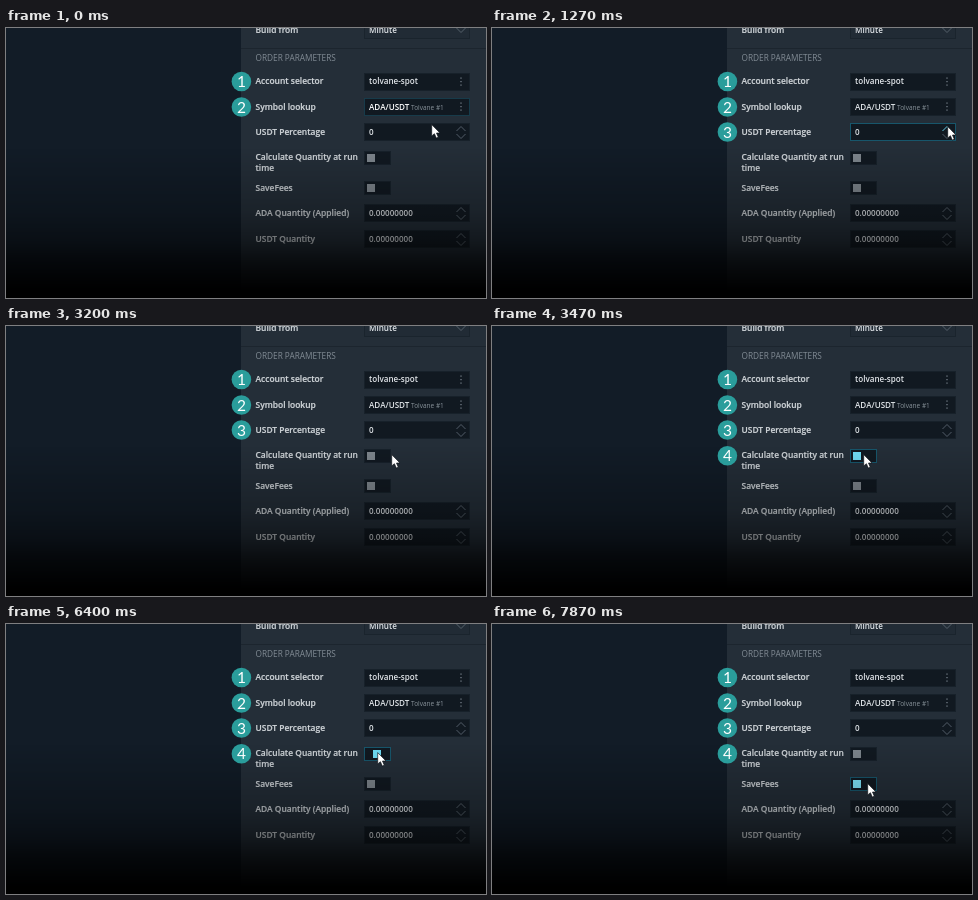
These frames come from a looping animation (480 px wide and 270 px high, 8 s). An HTML page:

```html
<!DOCTYPE html>
<html lang="en">
<head>
<meta charset="utf-8">
<title>Order parameters</title>
<style>
  html, body { margin: 0; width: 100%; height: 100%; overflow: hidden; background: #000; }
  svg { display: block; width: 100vw; height: 100vh; }
  text { font-family: "Open Sans", "Noto Sans", sans-serif; white-space: pre; }

  .label { font-size: 8.45px; font-weight: 600; fill: #cfd4d8; stroke: #cfd4d8; stroke-width: .2; }
  .head { font-size: 8.25px; fill: #828c95; }
  .value { font-size: 8.1px; font-weight: 600; fill: #e2e6ea; }
  .note { font-size: 6.5px; font-weight: 400; fill: #8a949c; }
  .field { fill: #111921; stroke: #17212a; }
  .select { fill: #212b35; stroke: #1a242d; }
  .icon { fill: none; stroke: #5b6670; stroke-width: .9; }
  .dots { fill: #7d8790; }
  .knob { fill: #7c848b; }
  .badge circle { fill: #2a9d9b; }
  .badge text { font: 15.5px Lato, sans-serif; fill: #fff; text-anchor: middle; }
  .focus { fill: none; stroke: #17566b; opacity: 0; }

  .anim { animation: 8s linear infinite; }
  .cursor { animation-name: move; }
  .three { animation-name: three; }
  .four { animation-name: four; }
  .symbol { animation-name: symbol; }
  .symbol-focus { animation-name: symbol-focus; }
  .percent { animation-name: percent; }
  .up { animation-name: up; }
  .quantity { animation-name: quantity; }
  .calc-knob { animation-name: slide, calc-tint; }
  .calc-focus { animation-name: calc-focus; }
  .fees-knob { animation-name: fees-tint; }
  .fees-focus { animation-name: fees-focus; }

  @keyframes move {
    0% { transform: translate(426px, 97px); animation-timing-function: steps(8); }
    6.6%, 10% { transform: translate(450.5px, 106px); animation-timing-function: steps(7); }
    15.8%, 32.5% { transform: translate(456px, 99px); animation-timing-function: step-end; }
    33.3% { transform: translate(454.5px, 99px); animation-timing-function: steps(2); }
    35% { transform: translate(445px, 103px); animation-timing-function: steps(2); }
    36.65% { transform: translate(427px, 111px); animation-timing-function: steps(4); }
    39.95% { transform: translate(386px, 129px); animation-timing-function: steps(4); }
    43.3%, 93.3% { transform: translate(372px, 129px); animation-timing-function: steps(3); }
    95.8% { transform: translate(374px, 145px); animation-timing-function: steps(3); }
    98.3%, 100% { transform: translate(376px, 160px); }
  }
  @keyframes three {
    0%, 3.3% { opacity: 0; animation-timing-function: steps(4); }
    6.6%, 100% { opacity: 1; }
  }
  @keyframes four {
    0%, 40% { opacity: 0; animation-timing-function: steps(4); }
    43.3%, 100% { opacity: 1; }
  }
  @keyframes symbol {
    0%, .8% { fill: #fff; animation-timing-function: steps(3); }
    3.3%, 100% { fill: #e2e6ea; }
  }
  @keyframes symbol-focus {
    0%, .8% { opacity: .5; animation-timing-function: steps(3); }
    3.3%, 100% { opacity: 0; }
  }
  @keyframes percent {
    0%, .8% { opacity: 0; animation-timing-function: steps(3); }
    3.3%, 36% { opacity: 1; animation-timing-function: steps(3); }
    38.5%, 100% { opacity: 0; }
  }
  @keyframes up {
    0%, 13% { stroke: #5b6670; animation-timing-function: steps(2); }
    15%, 34% { stroke: #6fdcf5; animation-timing-function: steps(2); }
    36%, 100% { stroke: #5b6670; }
  }
  @keyframes quantity {
    0%, 80% { visibility: visible; animation-timing-function: step-end; }
    50.875% { visibility: hidden; animation-timing-function: step-end; }
    100% { visibility: visible; }
  }
  @keyframes slide {
    0% { transform: none; animation-timing-function: step-end; }
    50.875% { transform: translateX(7px); animation-timing-function: step-end; }
    51.625% { transform: translateX(11px); animation-timing-function: step-end; }
    52.5% { transform: translateX(13px); animation-timing-function: step-end; }
    80% { transform: translateX(6px); animation-timing-function: step-end; }
    80.875% { transform: translateX(2px); animation-timing-function: step-end; }
    81.625%, 100% { transform: none; }
  }
  @keyframes calc-tint {
    0%, 40.8% { fill: #7c848b; animation-timing-function: steps(3); }
    43.3%, 95% { fill: #6fdcf5; animation-timing-function: steps(3); }
    97.5%, 100% { fill: #7c848b; }
  }
  @keyframes calc-focus {
    0%, 40.8% { opacity: 0; animation-timing-function: steps(3); }
    43.3%, 95% { opacity: 1; animation-timing-function: steps(3); }
    97.5%, 100% { opacity: 0; }
  }
  @keyframes fees-tint {
    0%, 96.6% { fill: #7c848b; animation-timing-function: steps(2); }
    98.3%, 100% { fill: #7fe6fb; }
  }
  @keyframes fees-focus {
    0%, 96.6% { opacity: 0; animation-timing-function: steps(2); }
    98.3%, 100% { opacity: 1; }
  }
</style>
</head>
<body>
<svg viewBox="0 0 480 270" preserveAspectRatio="none">
  <defs>
    <linearGradient id="shade" gradientUnits="userSpaceOnUse" x1="0" y1="120" x2="0" y2="264">
      <stop offset="0" stop-opacity="0"/>
      <stop offset=".45" stop-opacity=".25"/>
      <stop offset=".63" stop-opacity=".44"/>
      <stop offset=".8" stop-opacity=".74"/>
      <stop offset="1"/>
    </linearGradient>
    <rect id="box" x="358.5" y=".5" width="105" height="17"/>
    <rect id="switch" x="358.5" y=".5" width="26" height="13"/>
    <path id="chevron-up" d="M450.5 8 l4.5 -4.5 l4.5 4.5"/>
    <path id="chevron-down" d="M450.5 11 l4.5 4.5 l4.5 -4.5"/>
    <g id="more">
      <rect x="454.4" y="4.5" width="1.2" height="1.2"/>
      <rect x="454.4" y="8" width="1.2" height="1.2"/>
      <rect x="454.4" y="11.5" width="1.2" height="1.2"/>
    </g>
  </defs>

  <rect width="480" height="270" fill="#121c27"/>
  <rect x="235" width="245" height="270" fill="#242e38"/>
  <path d="M235 20.5 H480" stroke="#1c252e"/>

  <use href="#box" class="select" y="-7"/>
  <g class="field">
    <use href="#box" y="45"/>
    <use href="#box" y="70"/>
    <use href="#box" y="95"/>
    <use href="#switch" y="123"/>
    <use href="#switch" y="153"/>
  </g>

  <g class="label">
    <text x="249.5" y="5">Build from</text>
    <text x="249.5" y="56">Account selector</text>
    <text x="249.5" y="81.5">Symbol lookup</text>
    <text x="249.5" y="107">USDT Percentage</text>
    <text x="249.5" y="132.3">Calculate Quantity at run</text>
    <text x="249.5" y="143">time</text>
    <text x="249.5" y="162.5">SaveFees</text>
    <text x="249.5" y="188">ADA Quantity (Applied)</text>
    <text x="249.5" y="213.5">USDT Quantity</text>
  </g>
  <text class="head" x="249.5" y="32.7">ORDER PARAMETERS</text>

  <g class="value">
    <text x="363" y="5">Minute</text>
    <text x="363" y="56.3">tolvane-spot</text>
    <text class="anim symbol" x="363" y="81.8">ADA/USDT</text>
    <text class="note" x="405" y="81.8">Tolvane #1</text>
    <text x="363" y="107.2">0</text>
  </g>

  <path class="icon" d="M450.5 0 l4.5 4.5 l4.5 -4.5"/>
  <g class="dots">
    <use href="#more" y="45"/>
    <use href="#more" y="70"/>
  </g>
  <use href="#box" class="focus anim symbol-focus" y="70"/>
  <use href="#box" class="focus anim percent" y="95"/>
  <g class="icon">
    <use href="#chevron-up" class="anim up" y="95"/>
    <use href="#chevron-down" y="95"/>
  </g>

  <use href="#switch" class="focus anim calc-focus" y="123"/>
  <rect class="knob anim calc-knob" x="361" y="126" width="8" height="8"/>
  <use href="#switch" class="focus anim fees-focus" y="153"/>
  <rect class="knob anim fees-knob" x="361" y="156" width="8" height="8"/>

  <g class="anim quantity">
    <g class="field">
      <use href="#box" y="176"/>
      <use href="#box" y="202"/>
    </g>
    <g class="value">
      <text x="363" y="188.2">0.00000000</text>
      <text x="363" y="213.8">0.00000000</text>
    </g>
    <g class="icon">
      <use href="#chevron-up" y="176"/>
      <use href="#chevron-down" y="176"/>
      <use href="#chevron-up" y="202"/>
      <use href="#chevron-down" y="202"/>
    </g>
  </g>

  <rect y="120" width="480" height="150" fill="url(#shade)"/>

  <g class="badge"><circle cx="235.4" cy="53.5" r="9.8"/><text x="235.4" y="59">1</text></g>
  <g class="badge"><circle cx="235.4" cy="79" r="9.8"/><text x="235.4" y="84.5">2</text></g>
  <g class="badge anim three"><circle cx="235.4" cy="104" r="9.8"/><text x="235.4" y="109.5">3</text></g>
  <g class="badge anim four"><circle cx="235.4" cy="129.8" r="9.8"/><text x="235.4" y="135.3">4</text></g>

  <path class="anim cursor" d="M-.3 -.4 V11 L2.4 8.7 L4.3 13.1 L6.3 12.2 L4.5 8 H8 Z"
        fill="#fff" stroke="#10161c" stroke-width=".7" stroke-linejoin="round"/>
</svg>
</body>
</html>
```
